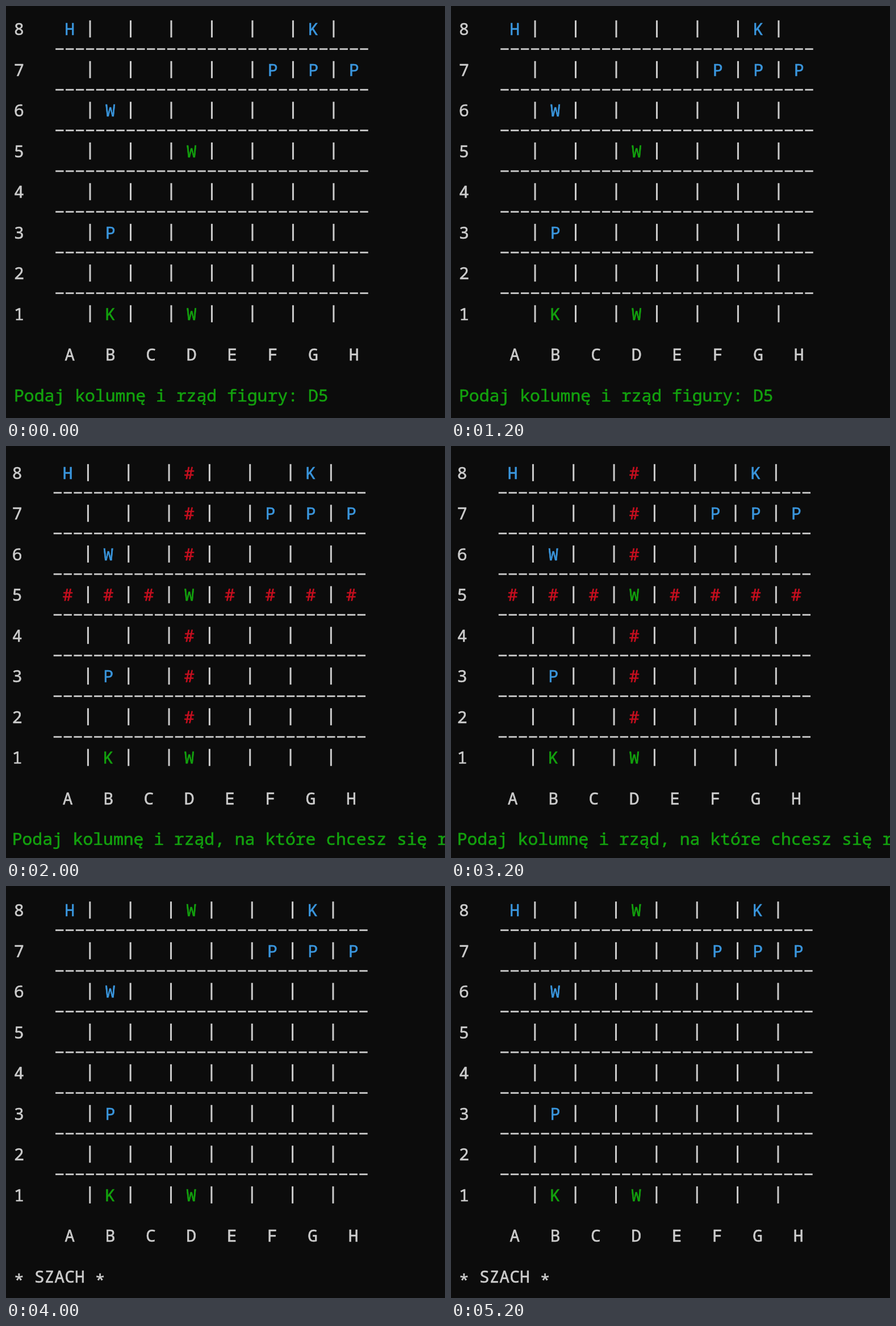
Recreate the animation shown at these times as an HTML page. Size 773 by 724 pixels, loop 6000 ms.

```html
<!DOCTYPE html>
<html lang="pl">
<head>
<meta charset="utf-8">
<title>Szachy w terminalu</title>
<style>
  html, body { margin: 0; width: 100%; height: 100%; overflow: hidden; background: #0c0c0c; }
  svg { display: block; width: 773px; height: 724px; }
  text {
    font-family: "Noto Sans Mono", "DejaVu Sans Mono", monospace; white-space: pre;
    fill: currentColor; stroke: currentColor; stroke-width: 0.6px;
  }
</style>
</head>
<body>
<svg id="stage" viewBox="0 0 773 724"></svg>
<script>
const svg = document.getElementById("stage");
const WHITE = "#cccccc", BLUE = "#3a96dd", GREEN = "#13a10e", RED = "#c50f1f";
const ROW = 71.5, STEP = 2000;

const blue = { A8: "H", G8: "K", F7: "P", G7: "P", H7: "P", B6: "W", B3: "P" };
const green = { B1: "K", D1: "W" };

// x, y: left edge and baseline of the top row; cw: character width
const screens = [
  { x: 14, y: 51, cw: 17.87, rook: "D5", color: GREEN,
    line: "Podaj kolumnę i rząd figury: D5" },
  { x: 10.7, y: 57.5, cw: 17.83, rook: "D5", color: GREEN, moves: true,
    line: "Podaj kolumnę i rząd, na które chcesz się ruszyć: " },
  { x: 14, y: 53, cw: 17.84, rook: "D8", color: WHITE,
    line: "* SZACH *" }
];

function add(parent, tag, attrs, text) {
  const el = document.createElementNS("http://www.w3.org/2000/svg", tag);
  for (const k in attrs) el.setAttribute(k, attrs[k]);
  if (text) el.textContent = text;
  parent.appendChild(el);
  return el;
}

function pieceAt(s, file, rank) {
  const sq = file + rank;
  if (sq === s.rook) return ["W", GREEN];
  if (blue[sq]) return [blue[sq], BLUE];
  if (green[sq]) return [green[sq], GREEN];
  if (s.moves && (file === s.rook[0] || rank === +s.rook[1])) return ["#", RED];
  return null;
}

function build(s) {
  const g = add(svg, "g", { "font-size": s.cw / 0.6, fill: WHITE });
  const mid = col => s.x + (col + 0.5) * s.cw;
  const put = (ch, col, y, color) =>
    add(g, "text", { x: mid(col), y, color, "text-anchor": "middle" }, ch);
  const files = [..."ABCDEFGH"];

  for (let r = 0; r < 8; r++) {
    const y = s.y + r * ROW, rank = 8 - r;
    put(rank, 0, y, WHITE);
    files.forEach((file, i) => {
      const p = pieceAt(s, file, rank);
      if (p) put(p[0], 5 + 4 * i, y, p[1]);
      if (i < 7) add(g, "rect", { x: mid(7 + 4 * i) - 1.5, y: y - 25.7, width: 3, height: 30 });
    });
    if (r < 7) for (let c = 4; c < 35; c++)
      add(g, "rect", { x: mid(c) - 7.2, y: y + 23.3, width: 14.4, height: 2.8 });
  }
  files.forEach((file, i) => put(file, 5 + 4 * i, s.y + 8 * ROW, WHITE));

  const y = s.y + 9 * ROW;
  if (s.line[0] === "*") {
    // asterisks sit at mid height
    put("*", 0, y + 6, s.color);
    add(g, "text", { x: s.x + 2 * s.cw, y, color: s.color }, s.line.slice(2, -2));
    put("*", s.line.length - 1, y + 6, s.color);
  } else {
    add(g, "text", { x: s.x, y, color: s.color }, s.line);
  }
  return g;
}

const groups = screens.map(build);

function draw(t) {
  const n = Math.floor(t / STEP) % groups.length;
  groups.forEach((g, i) => g.setAttribute("display", i === n ? "inline" : "none"));
}

const start = performance.now();
function tick() {
  draw(performance.now() - start);
  requestAnimationFrame(tick);
}
tick();
</script>
</body>
</html>
```
